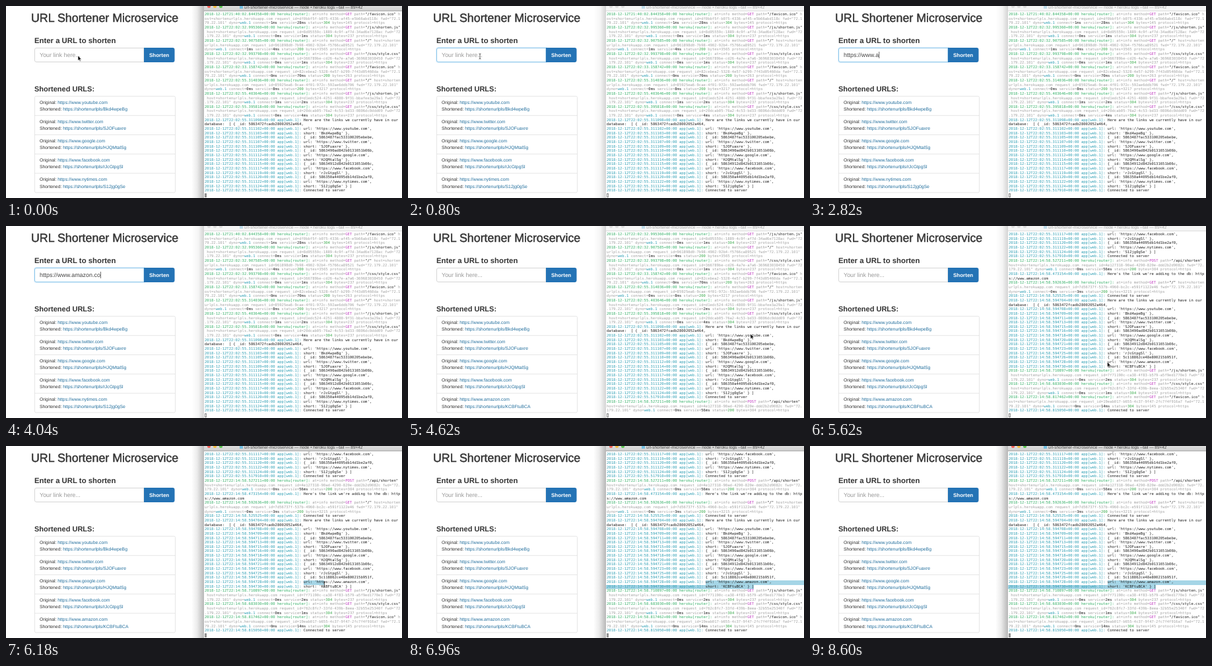
An HTML page for the animation above (8.66 s loop, 600 by 290 pixels).

```html
<!DOCTYPE html>
<html lang="en">
<head>
<meta charset="utf-8">
<title>URL Shortener Microservice</title>
<style>
html, body { margin: 0; width: 100%; height: 100%; overflow: hidden; background: #fff; }
body { text-rendering: geometricPrecision; font-family: "Liberation Sans", Arial, sans-serif; }
#stage { position: relative; width: 600px; height: 290px; overflow: hidden; background: #fff; }
#page, #mouse { position: absolute; left: 0; top: 0; }
#page text { fill: #333; white-space: pre; }
#page .row { font-size: 6.82px; }
#page .link { fill: #236f9d; }
#shade { position: absolute; left: 281px; top: 0; width: 19px; height: 290px;
  background: linear-gradient(90deg, #0000, #0000000a 55%, #0000002c); }
.active #shade { background: linear-gradient(90deg, #0000, #00000014 45%, #00000048); }
#term { position: absolute; left: 300px; top: 0; width: 300px; height: 290px; overflow: hidden; background: #fff; }
#bar { position: absolute; left: 0; top: 0; width: 300px; height: 8px; background: #f5f5f5;
  border-bottom: .5px solid #ddd; box-sizing: border-box; z-index: 2; }
.active #bar { background: linear-gradient(#dedede, #cfcfcf); border-color: #aaa; }
#bar span { position: absolute; left: 61px; top: -1.4px; font-size: 6.4px; line-height: 8px; white-space: pre; color: #a8a8a8; }
.active #bar span { color: #4a4a4a; }
#bar i { position: absolute; top: -2px; width: 5.4px; height: 5.4px; border-radius: 50%; background: #ddd; }
#bar b { position: absolute; left: 54px; top: 0; width: 5px; height: 4px; background: #bfdcea; }
.active #bar b { background: #74bfe0; }
.active #bar i:nth-of-type(1) { background: #f2625a; }
.active #bar i:nth-of-type(2) { background: #f4be45; }
.active #bar i:nth-of-type(3) { background: #5cc453; }
.sel { position: absolute; height: 6.66px; background: #a5d5e6; }
#log { position: absolute; left: 1px; bottom: .4px; width: 89.5ch; color: #222;
  font: 5.54px/6.66px "DejaVu Sans Mono", monospace; white-space: break-spaces; line-break: anywhere; }
#log .app { color: #2f9fb4; }
#log .router { color: #35b068; }
#log .dim { color: #a2a2a2; }
#log .verb { color: #c341c3; }
#log .ok { color: #3cab4e; }
#caret { display: block; width: 3.1px; height: 5.8px; box-sizing: border-box; border: .5px solid #8a8a8a; margin-bottom: .86px; }
.active #caret { background: #9a9a9a; }
</style>
</head>
<body>
<div id="stage">
  <svg id="page" width="300" height="290">
    <text x="38" y="23.700" font-size="17.84" style="stroke:#333;stroke-width:.45">URL Shortener Microservice</text>
    <text x="43" y="56" font-size="11.35" font-weight="bold">Enter a URL to shorten</text>
    <path id="glow" d="M209 63.500H46a2.500 2.500 0 0 0-2.500 2.500v16a2.500 2.500 0 0 0 2.500 2.500H209z" fill="none" stroke="#66afe9" stroke-opacity=".2" stroke-width="3"/>
    <path id="field" d="M209 63.500H46a2.500 2.500 0 0 0-2.500 2.500v16a2.500 2.500 0 0 0 2.500 2.500H209z" fill="#fff" stroke="#ccc" stroke-width=".8"/>
    <path d="M209 63h43.500a3 3 0 0 1 3 3v16a3 3 0 0 1-3 3h-43.500z" fill="#2473b5"/>
    <text x="217" y="77.200" font-size="8" font-weight="bold" style="fill:#fff">Shorten</text>
    <text id="entry" x="51" y="77.200" font-size="8.95"></text>
    <path id="bead" d="M0 69v10" stroke="#333" stroke-width=".7"/>
    <text x="43" y="129" font-size="11" font-weight="bold">Shortened URLS:</text>
    <g id="list"></g>
  </svg>
  <div id="shade"></div>
  <div id="term">
    <div class="sel" id="selA" style="top:203px;left:151px"></div>
    <div class="sel" id="selB" style="top:209.66px;left:0"></div>
    <div id="log"></div>
    <div id="bar"><i style="left:5px"></i><i style="left:14px"></i><i style="left:23px"></i><b></b><span>url-shortener-microservice — node • heroku logs --tail — 89×42</span></div>
  </div>
  <svg id="mouse" width="600" height="290">
    <path id="arrow" d="M0 0V7.500L1.800 5.900 3 8.500 4.200 8 3 5.400H5.300z" fill="#111" stroke="#fff" stroke-width=".5"/>
    <path id="beam" d="M-1.500-4Q0-4 0-3Q0-4 1.500-4M0-3V3M-1.500 4Q0 4 0 3Q0 4 1.500 4" fill="none" stroke="#222" stroke-width=".7"/>
  </svg>
</div>
<script>
const LOOP = 8660, FOCUS = 400, TYPE = 990, KEY = 140, SUBMIT = 4260, PICK = 5690, DROP = 6700;
const URL_TEXT = "https://www.amazon.com";
const $ = id => document.getElementById(id);

const sites = [
  ["youtube", "Bkd4wpeBg", "5863472fcadb28002052a464"],
  ["twitter", "SJOFuaxre", "5863487fac533100205ebebe"],
  ["google", "HJQMtalSg", "5863490ad842b0131651b06b"],
  ["facebook", "rJcGtpgSl", "58634912d842b0131651b06c"],
  ["nytimes", "S12jg0gSe", "586350a44095db14d1be2af0"]
];
const added = ["amazon", "KCBFtuBCA", "5c118862ce48e800215b951f"];
const updated = [...sites.slice(0, 4), added];

// Left page list
const entryRow = ([name, code], i) => {
  const y = 136.3 + 29.1 * i;
  const line = (dy, label, url) =>
    `<text class="row" x="51" y="${y + dy}">${label}: <tspan class="link">${url}</tspan></text>`;
  return (i ? `<path d="M43 ${y}H256.500" stroke="#e0e0e0" stroke-width=".8"/>` : "") +
    line(11.4, "Original", `https://www.${name}.com`) +
    line(21.8, "Shortened", `https://shortenurlpls/${code}`);
};
const listOf = items =>
  `<rect x="43.500" y="136.300" width="213" height="145.500" rx="2" fill="none" stroke="#e0e0e0" stroke-width=".8"/>` +
  items.map(entryRow).join("");
const pageLists = [listOf(sites), listOf(updated)];

// Terminal log
const span = (kind, text) => `<span class="${kind}">${text}</span>`;
const dim = text => span("dim", text);
const stamp = time => `2018-12-12T${time}+00:00 `;

const app = (time, text) => `<div>${span("app", stamp(time) + "app[web.1]:")} ${text}</div>`;
const route = (time, path, id, connect, service, status, bytes, verb = "GET") =>
  `<div>${span("router", stamp(time) + "heroku[router]:")}` +
  dim(" at=info method=") + span("verb", verb) + dim(" path=") + `"${path}"` +
  dim(` host=shortenurlpls.herokuapp.com request_id=${id} fwd="72.179.22.101" dyno=`) +
  span("app", "web.1") + dim(" connect=") + `${connect}ms` + dim(" service=") + `${service}ms` +
  dim(" status=") + span("ok", status) + dim(` bytes=${bytes} protocol=https`) + "</div>";

const links = (clock, micro, items) => {
  let step = 0;
  const say = text => {
    const lag = step ? 2 + Math.round(1.7 * step) : 0;
    step++;
    return app(`${clock}.${micro + lag}`, text);
  };
  return items.map(([name, code, id], i) =>
    say((i ? "" : "Here are the links we currently have in our database:  [ ") + `{ _id: ${id},`) +
    say(`url: 'https://www.${name}.com',`) +
    say(`short: '${code}' }${i < 4 ? "," : " ]"}`)).join("");
};

const JS = "/js/shorten.js", CSS = "/css/style.css", ICON = "/favicon.ico";
const batches = [
  [0, route("21:40:02.844358", ICON, "df0bbf5f-b075-4336-af45-e5b66abd118c", 1, 28, 304, 145) +
    route("22:02:32.995360", JS, "8d05559c-1889-4c9f-af7d-34ad6e7128ac", 0, 1, 304, 237) +
    route("22:02:32.907585", "/", "961898d0-7b98-4902-92b4-f5766ca89521", 1, 4, 200, 3565) +
    route("22:02:32.993798", CSS, "366789be-cd26-4a7e-a7a6-369683038450", 0, 1, 304, 237) +
    route("22:02:33.158742", ICON, "82cebea2-5328-4e57-b299-7f43d05460da", 0, 70, 200, 263) +
    route("22:02:55.314036", "/", "85925ea6-9cae-4f01-972c-592ae6ddb706", 0, 8, 200, 3217) +
    route("22:02:55.403646", JS, "d1edc524-4251-4800-9f31-bbafee3a29a1", 1, 2, 304, 237) +
    route("22:02:55.395818", CSS, "20dcab05-76a2-4c53-bd33-0806dc0ddd09", 0, 4, 304, 237) +
    links("22:02:55", 311098, sites) +
    app("22:02:55.517910", "Connected to server")],
  [4560, route("22:14:58.527211", "/api/shorten", "4e127318-90ad-4290-820e-ddd2b2d9082c", 0, 56, 200, 304, "POST")],
  [4860, app("22:14:58.473154", `Here's the link we're adding to the db: ${URL_TEXT}`) +
    route("22:14:58.592636", "/", "7d56737f-537b-4960-bc2c-e591f1122e46", 0, 3, 200, 3215) +
    app("22:14:58.525525", "Connected to server")],
  [5080, links("22:14:58", 594704, updated)],
  [5280, route("22:14:58.710897", JS, "7f71190c-ca38-4f83-b579-a5f9ed1770e3", 0, 2, 304, 237) +
    route("22:14:58.683030", CSS, "762c8fc7-33fd-439b-8eea-32b55e25340f", 0, 1, 304, 237) +
    route("22:14:58.817462", ICON, "19eab017-b655-4c37-9f47-2fc7f4f916a7", 0, 14, 304, 145) +
    app("22:14:58.815050", "Connected to server")]
];
$("log").innerHTML = batches.map(b => `<section>${b[1]}</section>`).join("") + '<span id="caret"></span>';
const sections = [...$("log").querySelectorAll("section")];

// Pointer stops: time, x, y
const stops = [
  [0, 109, 75], [350, 109, 76], [SUBMIT, 109, 76], [4590, 519, 163],
  [4750, 519, 163], [5500, 450, 205], [5750, 451, 206], [DROP, 524, 213]
];
const pointerAt = t => {
  const i = stops.findIndex(s => s[0] > t);
  if (i < 0) return stops[stops.length - 1].slice(1);
  const [t0, x0, y0] = stops[i - 1], [t1, x1, y1] = stops[i];
  const k = (t - t0) / (t1 - t0), e = k * k * (3 - 2 * k);
  return [x0 + (x1 - x0) * e, y0 + (y1 - y0) * e];
};

const show = (el, on) => { el.style.display = on ? "" : "none"; };
let shownList = -1;

function draw(t) {
  const focused = t >= FOCUS && t < SUBMIT;
  const count = focused ? Math.max(0, Math.min(URL_TEXT.length, Math.floor((t - TYPE) / KEY))) : 0;
  const entry = $("entry");
  entry.textContent = count ? URL_TEXT.slice(0, count) : "Your link here...";
  entry.style.fill = count ? "#444" : "#999";
  show($("glow"), focused);
  $("field").setAttribute("stroke", focused ? "#74bbe6" : "#ccc");
  const blink = Math.floor((t - 300) / 500) % 2 === 0;
  show($("bead"), focused && (count > 0 || blink));
  $("bead").setAttribute("transform", `translate(${count ? 51.6 + entry.getComputedTextLength() : 51})`);

  const which = t < SUBMIT ? 0 : 1;
  if (which !== shownList) $("list").innerHTML = pageLists[shownList = which];

  $("stage").className = t < FOCUS || t >= PICK ? "active" : "";
  sections.forEach((s, i) => show(s, t >= batches[i][0]));

  const [x, y] = pointerAt(t);
  const dragging = t >= PICK, second = y > 209.6;
  show($("selA"), dragging);
  show($("selB"), dragging && second);
  $("selA").style.width = (second ? 149 : Math.max(0, x - 451)) + "px";
  $("selB").style.width = x - 300 + "px";

  const typing = t >= TYPE + KEY && t < SUBMIT;
  const beam = (t >= FOCUS && t < SUBMIT) || dragging;
  show($("arrow"), !beam);
  show($("beam"), beam && !typing && t < DROP + 100);
  for (const id of ["arrow", "beam"]) $(id).setAttribute("transform", `translate(${x} ${y})`);
}

const start = performance.now();
function tick() {
  draw((performance.now() - start) % LOOP);
  requestAnimationFrame(tick);
}
tick();
</script>
</body>
</html>
```
